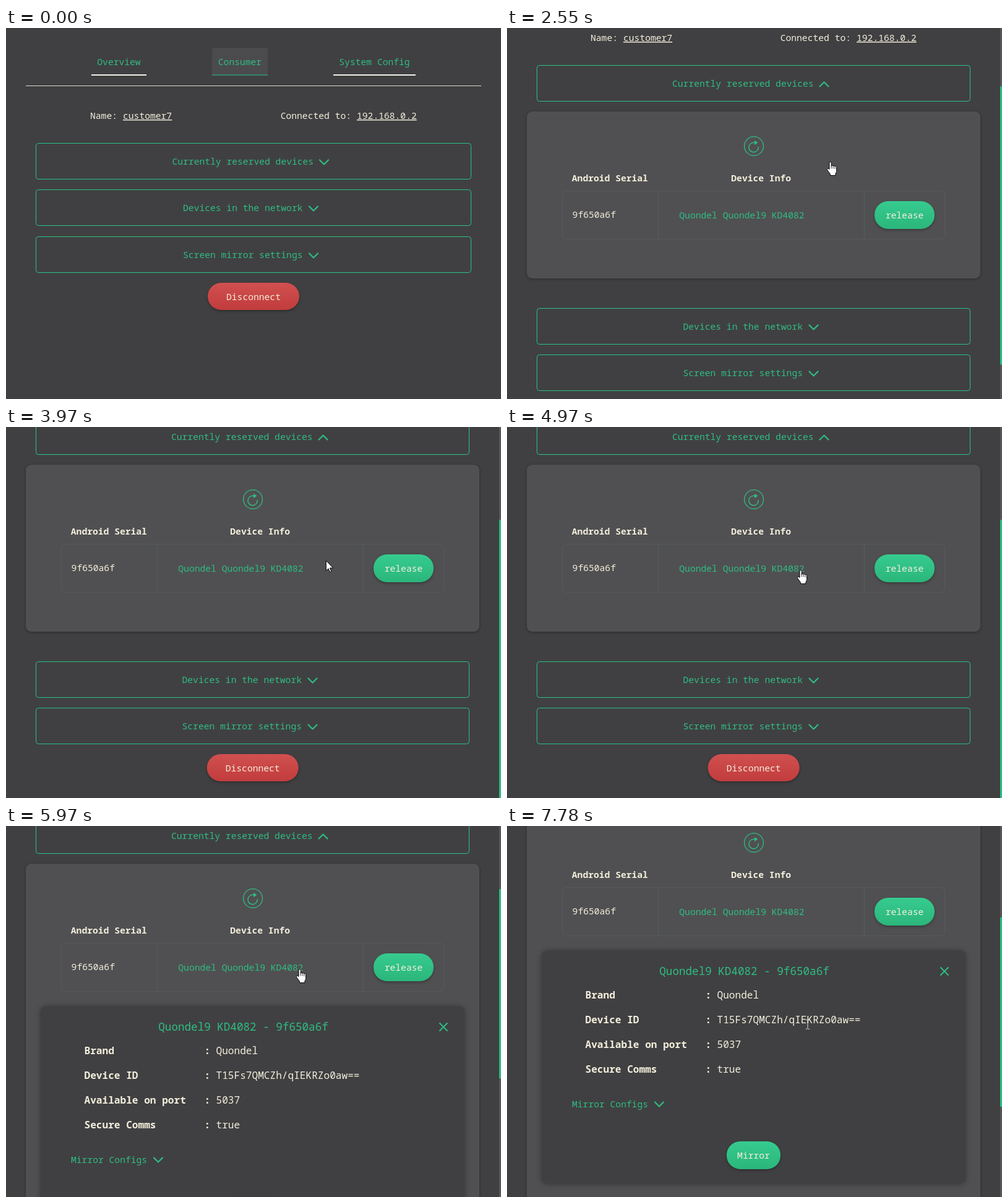
Write an HTML page that moves like this. It is 800 by 600 pixels and loops after 8 s.

```html
<!DOCTYPE html>
<html lang="en">
<head>
<meta charset="utf-8">
<title>Consumer page</title>
<style>
html, body { margin: 0; width: 100%; height: 100%; overflow: hidden; background: #404042; }
svg { display: block; width: 800px; height: 600px; }
text { font-family: "Noto Sans Mono", monospace; font-size: 14.667px; fill: #f3eedc; white-space: pre; }
.g { fill: #2ebd82; }
.b { font-weight: 700; }
.t { font-size: 17.6px; }
.r { font-size: 16.13px; }
.u { text-decoration: underline; }
.m { text-anchor: middle; }
.box { fill: none; stroke: #29c284; }
.ico { fill: none; stroke: #2ebd82; stroke-width: 2.2; stroke-linecap: round; stroke-linejoin: round; }
.cell { fill: none; stroke: #58595b; }
.btn { filter: drop-shadow(0 2px 2px rgba(0, 0, 0, .3)); }
.card { filter: drop-shadow(0 1px 2px rgba(0, 0, 0, .35)); }
.cur { fill: #fff; stroke: #000; stroke-width: 1; stroke-linejoin: round; }
</style>
</head>
<body>
<svg id="stage" viewBox="0 0 800 600" xmlns="http://www.w3.org/2000/svg"></svg>
<script>
const LOOP = 8000;
const text = (x, y, s, cls = '') => `<text x="${x}" y="${y}" class="${cls}">${s}</text>`;
const rect = (x, y, w, h, rest) => `<rect x="${x}" y="${y}" width="${w}" height="${h}" ${rest}/>`;
const chevron = (x, y, id = '') => `<path id="${id}" class="ico" d="${chevPath(x, y, 1)}"/>`;
function chevPath(x, y, dir) {
  return `M${x - 7} ${y - 3.5 * dir}L${x} ${y + 3.5 * dir}L${x + 7} ${y - 3.5 * dir}`;
}
const button = (x, y, w, h, fill, label) =>
  rect(x, y, w, h, `rx="22" fill="url(#${fill})" class="btn"`) + text(x + w / 2, y + h / 2 + 5.5, label, 'm');
const fold = (id, x, label, chevX) =>
  `<g id="${id}">${rect(48.5, .5, 703, 58, 'rx="4" class="box"')}
  <g class="mid">${text(x, 34.5, label, 'g')}${chevron(chevX, 31, id + 'Arrow')}</g></g>`;
const grad = (id, a, b) => `<linearGradient id="${id}" x2="0" y2="1">
  <stop stop-color="${a}"/><stop offset="1" stop-color="${b}"/></linearGradient>`;
const tab = (x, w, label, line) =>
  rect(x, 75, w, 2, `fill="${line}"`) + text(x + w / 2, 60, label, 'g m');

const details = [
  ['Brand', 'Quondel'],
  ['Device ID', 'T15Fs7QMCZh/qIEKRZo0aw=='],
  ['Available on port', '5037'],
  ['Secure Comms', 'true']
].map(([key, value], i) => {
  const y = 569 + i * 40;
  return text(126.5, y, key, 'r b') + text(320.5, y, ':', 'r b') + text(339.5, y, value, 'r');
}).join('');

const header = `
  <g class="mid">
    ${rect(333, 32, 90, 45, 'rx="3" fill="#4b4b4d"')}
    ${tab(138, 89, 'Overview', '#f0f0ea')}
    ${tab(333, 90, 'Consumer', '#35876d')}
    ${tab(529, 133, 'System Config', '#f0f0ea')}
  </g>
  <rect id="rule" x="32" y="93" width="736" height="1" fill="#dcdccc"/>
  <g id="name">${text(136, 147, 'Name:')}${text(189, 147, 'customer7', 'u')}</g>
  <g id="link">${text(443.7, 147, 'Connected to:')}${text(567, 147, '192.168.0.2', 'u')}</g>`;

const panel = `
  <g id="panel" clip-path="url(#panelClip)">
    <rect id="card" x="32" y="261" width="733" height="270" rx="9" fill="#505052" class="card"/>
    <circle cx="399" cy="317" r="15.4" class="ico" style="stroke-width:1.3"/>
    <path d="M406.3 318.5A7.7 7.7 0 1 1 398.6 311.3H402" class="ico" style="stroke-width:1.4"/>
    <path d="M400 308L405.5 311.3L400 315.2Z" class="g"/>
    ${text(104.8, 374, 'Android Serial', 'b')}${text(362.3, 374, 'Device Info', 'b')}
    ${rect(89.5, 389.5, 618, 78, 'rx="6" class="cell"')}
    <path d="M244.5 390V467M577.5 390V467" class="cell" style="stroke:#50605e"/>
    ${text(105.6, 433, '9f650a6f')}
    ${text(278.3, 434, 'Quondel Quondel9 KD4082', 'g')}
    ${button(594, 406, 97, 45, 'green', 'release')}
    <g id="modal" clip-path="url(#modalClip)">
      ${rect(56, 491, 685, 377, 'rx="9" fill="#404042" style="filter:drop-shadow(0 1px 4px rgba(0,0,0,.35))"')}
      ${text(246.3, 531, 'Quondel9 KD4082 - 9f650a6f', 'g t')}
      <path d="M701 519L713 531M713 519L701 531" class="ico" style="stroke-width:2"/>
      ${details}
      ${text(105, 745, 'Mirror Configs', 'g')}${chevron(246, 740)}
      ${button(355, 800, 87, 45, 'green', 'Mirror')}
    </g>
  </g>`;

const cursors = `
  <circle id="press" cx="474" cy="231" r="12" fill="#ff0" fill-opacity=".47"/>
  <g id="cursor">
    <path id="arrow" class="cur" d="M.3 0V16.4L4 12.9L6.4 18.4L8.8 17.4L6.5 12H11.7Z"/>
    <g id="hand" transform="translate(-5.5 -1)">
      <path class="cur" d="M4.5 12.5V2.3a1.6 1.6 0 0 1 3.2 0V7.4c.2-1.5 2.9-1.5 2.9.3c.2-1.3 2.8-1.2 2.8.7
        c.4-1 2.7-.7 2.7 1V15.5c0 2-1.2 3-1.7 4.5V22.5H6V20.5C4.5 18 2.5 15.8 1.2 13.6C.2 11.8 1.9 10.6 3.2 11.6Z"/>
      <path d="M7.7 7V11.5M10.6 8V11.5M13.4 9V12" stroke="#000" stroke-width=".8"/>
    </g>
    <path id="beam" d="M-3 -7.5H-1L0 -6.5L1 -7.5H3M0 -6.5V6.5M-3 7.5H-1L0 6.5L1 7.5H3" fill="none" stroke="#d8d8d4"/>
  </g>`;

const stage = document.getElementById('stage');
stage.innerHTML = `<defs>
  ${grad('green', '#36cb8f', '#2bb67b')}${grad('red', '#d05050', '#c23c3c')}
  <clipPath id="panelClip"><rect id="panelWin" x="0" y="245" width="800" height="0"/></clipPath>
  <clipPath id="modalClip"><rect id="modalWin" x="0" y="468" width="800" height="0"/></clipPath>
  </defs>
  <rect width="800" height="600" fill="#404042"/>
  <g id="page">${header}
    ${fold('reserved', 268.5, 'Currently reserved devices', 514)}
    ${panel}
    ${fold('network', 286, 'Devices in the network', 497)}
    ${fold('mirror', 286, 'Screen mirror settings', 497)}
    <g id="leave">${button(326, 0, 148, 44, 'red', 'Disconnect')}</g>
  </g>
  <g id="bar">${rect(797, 0, 3, 600, 'fill="#58585a"')}<rect id="thumb" x="797" width="3" fill="#2bbf82"/></g>
  ${cursors}`;

const el = {};
stage.querySelectorAll('[id]').forEach(n => { if (n.id) el[n.id] = n; });
const mids = stage.querySelectorAll('.mid');
const boxes = stage.querySelectorAll('.box');

const span = (t, a, b) => Math.min(1, Math.max(0, (t - a) / (b - a)));
const outCubic = p => 1 - (1 - p) ** 3;
const inOutCubic = p => p < .5 ? 4 * p ** 3 : 1 - 4 * (1 - p) ** 3;
const move = (n, x, y) => n.setAttribute('transform', `translate(${x} ${y})`);
const set = (n, k, v) => n.setAttribute(k, v);
const show = (n, on) => set(n, 'visibility', on ? 'visible' : 'hidden');

// time, x, y of the pointer tip
const track = [
  [860, 646, 525], [1130, 602, 420], [1350, 573, 318], [1500, 548, 248], [1598, 529, 214],
  [1865, 522, 217], [3820, 522, 217], [3950, 517, 216], [4085, 517, 216], [4488, 474, 232],
  [6505, 474, 232], [6800, 479, 272], [7109, 485.5, 321]
];
function pointer(t) {
  let i = 0;
  while (i < track.length - 2 && t > track[i + 1][0]) i++;
  const [a, b] = [track[i], track[i + 1]];
  const p = span(t, a[0], b[0]);
  return [a[1] + (b[1] - a[1]) * p, a[2] + (b[2] - a[2]) * p];
}
function shape(t, x, y) {
  if (t < 1865) return [186, 261, 337].some(top => y >= top && y < top + 59) ? 'hand' : 'arrow';
  if (t < 2800) return 'hand';
  if (y > 312) return 'beam';
  return x < 481 && y < 241 ? 'hand' : 'arrow';
}

function draw(ms) {
  const t = ms < 852 ? 0 : 860 + Math.floor((ms - 852) / 67.2) * 67.2;
  const open = outCubic(span(t, 2150, 2540));
  const info = outCubic(span(t, 5530, 5940));
  const height = 482.4 + 317.6 * open + 376 * info;
  const wide = height <= 600;
  const wanted = 200 * inOutCubic(span(t, 2216, 2808)) + 90 * inOutCubic(span(t, 7510, 7780));
  const scroll = Math.round(Math.max(0, Math.min(wanted, height - 600)));
  const push = 317.6 * open + 376 * info;

  move(el.page, 0, -scroll);
  mids.forEach(n => move(n, wide ? 0 : -1.5, 0));
  boxes.forEach(n => set(n, 'width', wide ? 703 : 700));
  set(el.rule, 'width', wide ? 736 : 733);
  move(el.name, wide ? 0 : -1, 0);
  move(el.link, wide ? 0 : -2, 0);

  move(el.reserved, 0, 186);
  move(el.network, 0, Math.round(261.4 + push));
  move(el.mirror, 0, Math.round(336.6 + push));
  move(el.leave, wide ? 0 : -1.3, Math.round(411.7 + push));
  set(el.reservedArrow, 'd', chevPath(514, 31, open > 0 ? -1 : 1));

  show(el.panel, open > 0);
  set(el.panelWin, 'height', push);
  set(el.card, 'height', 270 + 376 * info);
  show(el.modal, info > 0);
  set(el.modalWin, 'height', 410 * info);

  show(el.bar, !wide);
  set(el.thumb, 'y', scroll * 600 / height);
  set(el.thumb, 'height', 360000 / height);

  const [x, y] = pointer(t);
  const kind = t < 860 ? '' : shape(t, x, y);
  move(el.cursor, Math.round(x), Math.round(y));
  ['arrow', 'hand', 'beam'].forEach(k => show(el[k], k === kind));
  show(el.press, t > 4880 && t < 4940);
}

const start = performance.now();
function frame() {
  draw((performance.now() - start) % LOOP);
  requestAnimationFrame(frame);
}
frame();
</script>
</body>
</html>
```
